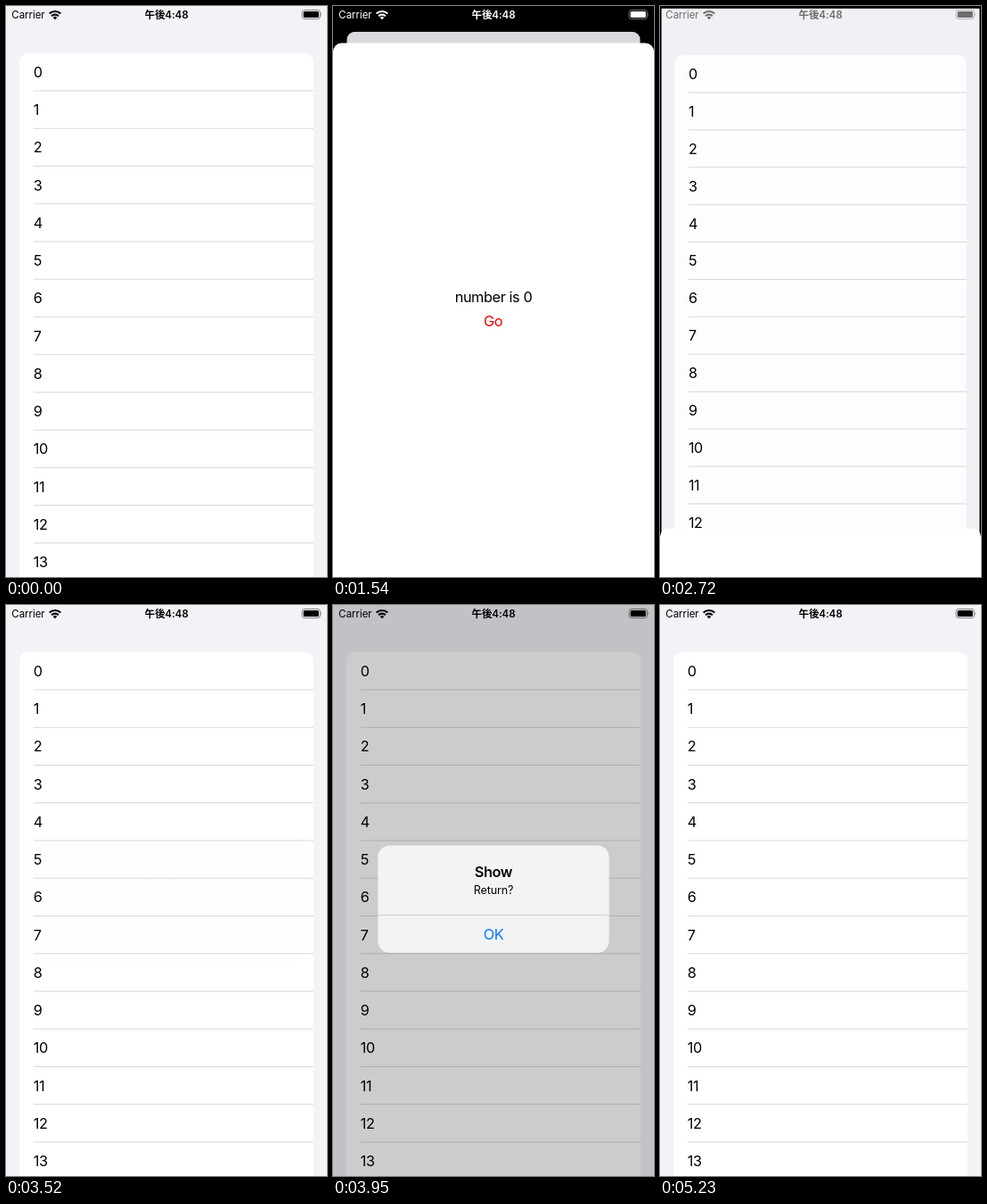
An HTML page for the animation above (5330 ms loop, 360 px wide and 640 px high).

```html
<!DOCTYPE html>
<html lang="ja">
<head>
<meta charset="utf-8">
<title>List, sheet and alert</title>
<style>
  html, body { margin: 0; width: 100%; height: 100%; overflow: hidden; background: #000; }
  svg { display: block; width: 100vw; height: 100vh; }
  text { font-family: Inter, "Noto Sans CJK JP", "Noto Sans CJK", sans-serif; font-size: 16.3px; letter-spacing: -.4px; }
  .small { font-size: 11.5px; letter-spacing: -.05px; }
  .message { font-size: 12.5px; letter-spacing: -.1px; }
  .bold { font-weight: 600; }
  .middle { text-anchor: middle; }
</style>
</head>
<body>
<svg viewBox="0 0 360 640">
  <defs>
    <clipPath id="screenClip"><rect id="screenEdge" width="360" height="640"/></clipPath>
  </defs>
  <rect width="360" height="640"/>

  <g id="screen" clip-path="url(#screenClip)">
    <rect width="360" height="640" fill="#f2f2f7"/>
    <rect x="15.2" y="52.8" width="329.6" height="620" rx="9.6" fill="#fff"/>
    <g id="rows"></g>
    <rect id="screenDim" width="360" height="640"/>
  </g>

  <g id="sheet">
    <rect y="41.6" width="360" height="640" rx="9.6" fill="#fff"/>
    <text class="middle" x="180" y="332.2">number is 0</text>
    <text id="go" class="middle" x="179.5" y="358.9" fill="#f00000">Go</text>
  </g>

  <g id="status">
    <text class="small" x="6.3" y="14.2">Carrier</text>
    <g fill="none" stroke="currentColor" stroke-width="2.1">
      <path d="M48.7 8.6a9 9 0 0 1 12.6 0"/>
      <path d="M51.1 11.2a5.6 5.6 0 0 1 7.8 0"/>
    </g>
    <path d="M55 15.2l-2.2-2.3a3.2 3.2 0 0 1 4.4 0z"/>
    <text class="small bold middle" x="180" y="14.2">午後4:48</text>
    <rect x="332" y="4.5" width="20.4" height="10" rx="2.8" fill="none" stroke="currentColor" stroke-opacity=".45"/>
    <path d="M353.4 7.8q1.6 1.7 0 3.4z" fill-opacity=".5"/>
    <rect x="333.6" y="6.1" width="17.2" height="6.8" rx="1.5"/>
  </g>

  <rect id="alertDim" width="360" height="640"/>
  <g id="alert">
    <rect x="50.4" y="269.4" width="259.2" height="120.4" rx="13.2" fill="#f3f3f3"/>
    <path id="pressed" d="M50.4 347.6h259.2v29a13.2 13.2 0 0 1-13.2 13.2h-232.8a13.2 13.2 0 0 1-13.2-13.2z" fill="#dedede"/>
    <path d="M50.4 347.6h259.2" stroke="#c4c4c6" stroke-width=".8"/>
    <text class="bold middle" x="180" y="304.5">Show</text>
    <text class="message middle" x="180" y="324.4">Return?</text>
    <text class="middle" x="180" y="374.5" fill="#007aff">OK</text>
  </g>
</svg>
<script>
const LOOP = 5330;
const ROW = 42.24, LIST_TOP = 52.8;
const SHEET_TOP = 41.6;
// The picture is held between these moments.
const TICKS = [0, 1220, 1340, 1440, 1540, 2490, 2610, 2720, 2830, 2930,
  3520, 3640, 3750, 3850, 3950, 4810, 4920, 5030, 5130, 5230];

const el = id => document.getElementById(id);
const set = (id, attrs) => {
  for (const name in attrs) el(id).setAttribute(name, attrs[name]);
};
const clamp = v => Math.min(1, Math.max(0, v));

// Critically damped spring from 0 to 1.
function settle(time, start, rate = 18.3) {
  const t = (time - start) / 1000;
  if (t <= 0) return 0;
  if (t >= 0.36) return 1;
  return 1 - (1 + rate * t) * Math.exp(-rate * t);
}

function smooth(time, start) {
  const t = clamp((time - start) / 400);
  return t * t * (3 - 2 * t);
}

el('rows').innerHTML = Array.from({ length: 14 }, (_, i) => {
  const top = LIST_TOP + i * ROW;
  return `<text x="30.8" y="${top + 27.1}">${i}</text>` +
    `<path d="M30.8 ${top + ROW}H344.8" stroke="#cfcfd1" stroke-width=".8"/>`;
}).join('');

function draw(time) {
  const up = settle(time, 1136) - settle(time, 2501);
  const scale = 1 - 0.0853 * up;
  set('screen', { transform: `translate(${180 * (1 - scale)} ${28.8 * up}) scale(${scale})` });
  set('screenEdge', { rx: 10.5 * up });
  set('screenDim', { opacity: 0.1 * up });
  set('sheet', { transform: `translate(0 ${(640 - SHEET_TOP) * (1 - up)})` });
  set('go', { opacity: time >= 2490 && time < 2610 ? 0.4 : 1 });

  const level = Math.round(255 * clamp(smooth(time, 1136) - smooth(time, 2501)));
  const tint = `rgb(${level},${level},${level})`;
  set('status', { fill: tint, color: tint });

  const shown = settle(time, 3510, 14);
  const alpha = shown - settle(time, 4865);
  const grow = 1 + 0.2 * (1 - shown);
  set('alertDim', { opacity: 0.2 * alpha });
  set('alert', {
    opacity: alpha,
    transform: `translate(180 329.6) scale(${grow}) translate(-180 -329.6)`
  });
  set('pressed', { opacity: time >= 4810 && time < 4920 ? 1 : 0 });
}

const begin = performance.now();
function tick() {
  const now = (performance.now() - begin) % LOOP;
  draw(TICKS.filter(t => t <= now).pop());
  requestAnimationFrame(tick);
}
tick();
</script>
</body>
</html>
```
